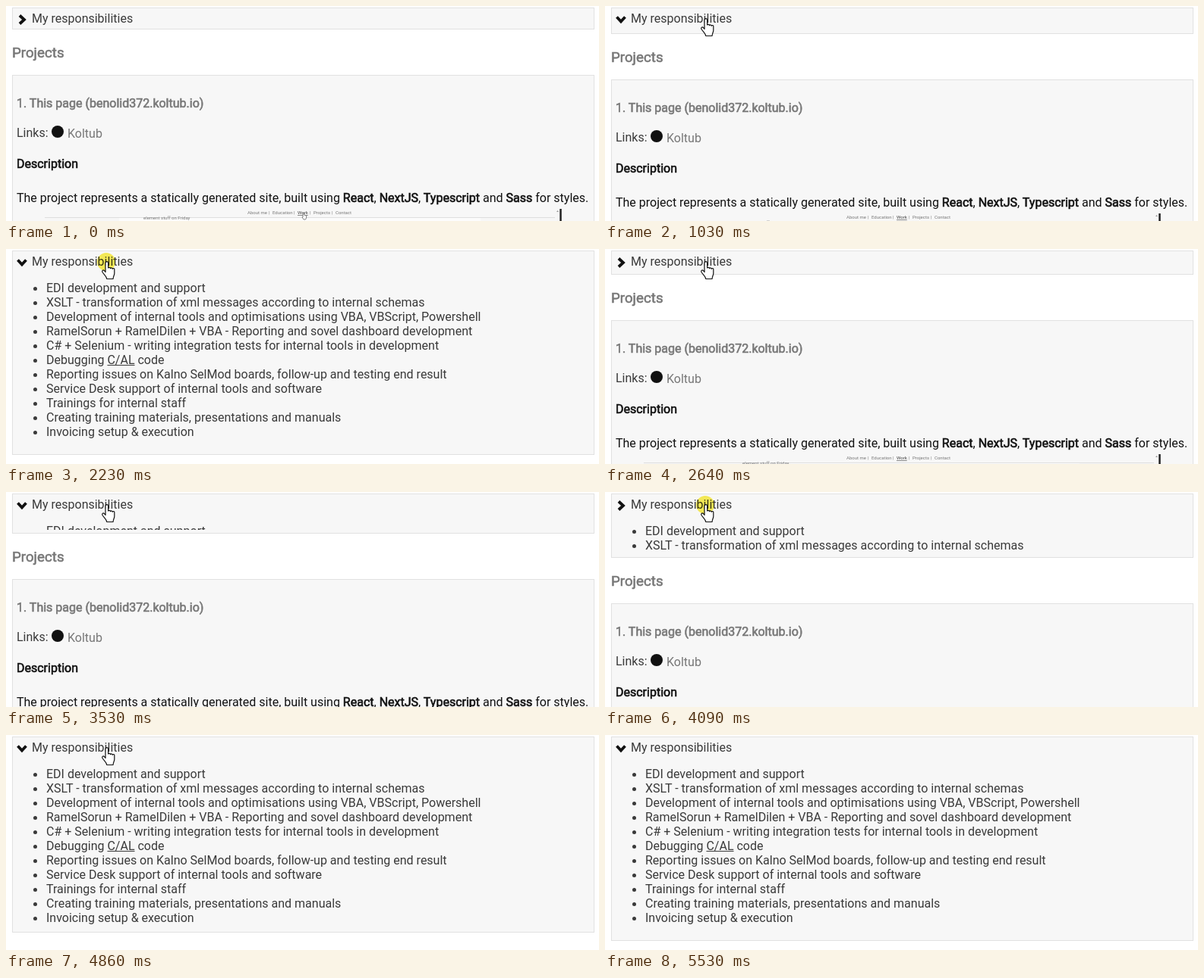
These frames come from a looping animation (781x284 px, 5860 ms). An HTML page:

```html
<!DOCTYPE html>
<html lang="en">
<head>
<meta charset="utf-8">
<title>Collapsible panel</title>
<style>
html, body { margin: 0; width: 100%; height: 100%; overflow: hidden; background: #fff; }
body { position: relative; font: 16px/19px Roboto, sans-serif; color: #3a3a3a; }
#stage { position: absolute; left: 0; top: 0; width: 781px; height: 284px; overflow: hidden; }
#stage div, svg { position: absolute; white-space: nowrap; }
.box { left: 8px; width: 765px; background: #f7f7f7; border: 1px solid #e1e1e1; }
#panel { top: 2px; }
#clip { left: 0; top: 0; width: 100%; overflow: hidden; }
ul { position: absolute; left: 0; top: 39px; margin: 0; padding: 0 0 0 44px; list-style: none; }
li { position: relative; height: 19px; white-space: nowrap; }
li::before { content: ""; position: absolute; left: -17px; top: 8px; width: 5px; height: 5px; border-radius: 50%; background: #3a3a3a; }
#below { left: 0; top: 0; width: 781px; height: 320px; }
b { font-weight: 400; -webkit-text-stroke: .6px currentColor; }
.gray { color: #777; }
.black { color: #111; }
#thumb { left: 51px; top: 267px; width: 682px; height: 60px; overflow: hidden; }
svg { left: 0; top: 0; overflow: visible; }
</style>
</head>
<body>
<div id="stage">
  <div id="panel" class="box">
    <div id="clip">
      <ul>
        <li>EDI development and support</li>
        <li>XSLT - transformation of xml messages according to internal schemas</li>
        <li>Development of internal tools and optimisations using VBA, VBScript, Powershell</li>
        <li>RamelSorun + RamelDilen + VBA - Reporting and sovel dashboard development</li>
        <li>C# + Selenium - writing integration tests for internal tools in development</li>
        <li>Debugging <u>C/AL</u> code</li>
        <li>Reporting issues on Kalno SelMod boards, follow-up and testing end result</li>
        <li>Service Desk support of internal tools and software</li>
        <li>Trainings for internal staff</li>
        <li>Creating training materials, presentations and manuals</li>
        <li>Invoicing setup &amp; execution</li>
      </ul>
    </div>
  </div>
  <div style="left:34px;top:7px">My responsibilities</div>

  <div id="below">
    <div class="gray" style="left:8px;top:51px;font-size:18.72px;line-height:22px"><b>Projects</b></div>
    <div class="box" style="top:91px;height:400px"></div>
    <div class="gray" style="left:14px;top:119px"><b>1. This page (benolid372.koltub.io)</b></div>
    <div style="left:14px;top:158px">Links:</div>
    <div style="left:60px;top:158px;width:16px;height:16px;border-radius:50%;background:#111"></div>
    <div class="gray" style="left:81px;top:159px">Koltub</div>
    <div class="black" style="left:14px;top:199px"><b>Description</b></div>
    <div class="black" style="left:14px;top:244px">The project represents a statically generated site, built using <b>React</b>, <b>NextJS</b>, <b>Typescript</b> and <b>Sass</b> for styles.</div>
    <div id="thumb">
      <svg width="682" height="60">
        <path d="M0 12.5H672" stroke="#dedede"/>
        <path d="M98 13H574V60H98Z" fill="#fcfcfc"/>
        <path d="M679.5 1V60" stroke="#222" stroke-width="2.5"/>
        <path d="M674 5l1.5-2 1.5 2z" fill="#999"/>
        <g font-family="Roboto, sans-serif" font-size="6" fill="#777">
          <text x="267" y="8">About me</text><text x="295" y="8">|</text>
          <text x="300" y="8">Education</text><text x="328" y="8">|</text>
          <text x="333" y="8" text-decoration="underline" fill="#444">Work</text><text x="349" y="8">|</text>
          <text x="354" y="8">Projects</text><text x="378" y="8">|</text>
          <text x="383" y="8">Contact</text>
          <text x="130" y="14.5">element stuff on Friday</text>
        </g>
        <path id="mini" d="M340 12V6.5h1.5V9l3 .8V13l-1 2h-2.5l-2-3z" fill="#fff" stroke="#555" stroke-width=".7"/>
      </svg>
    </div>
  </div>

  <svg width="781" height="284">
    <path id="chevron" d="M-3.5-5.5L2.5 0L-3.5 5.5" fill="none" stroke="#111" stroke-width="3.8"/>
    <circle id="press" cx="132" cy="17" r="12" fill="#fbee3c" style="mix-blend-mode:multiply" opacity=".85"/>
    <g id="cursor" fill="#fff" stroke="#111" stroke-width="1.2" stroke-linejoin="round">
      <path id="hand" d="M-1 13V2.5a1.8 1.8 0 0 1 3.6 0V9a1.6 1.6 0 0 1 2.9.6a1.5 1.5 0 0 1 2.7.7a1.4 1.4 0 0 1 2.6 1V16c0 3-1.6 4-1.8 7.5H.8C.5 20-3 18-5.1 14.2c-.8-1.8 1.2-3 2.6-1.6L-1 14.5z"/>
      <path id="arrow" d="M.5.5V16.5L4.3 13L6.8 18.7L9.3 17.6L6.8 12H12z"/>
    </g>
  </svg>
</div>

<script>
const LOOP = 5860, STEP = 70, SLIDE = 400;
const CLOSED = 30, FULL = 241;
// Screen refreshes come every STEP, restarting at each of these times.
const restarts = [0, 620, 1030, 2230, 2360, 3400, 3530, 4020, 5190, 5530];
const toggles = [1013, 2295, 3489, 3903, 4110, 4357, 4600];
const presses = [[890, 1010], [2225, 2350], [3395, 3480], [3860, 3900], [4080, 4140], [4300, 4357], [4570, 4640]];
const HOME = [132, 16], ENTRY = [685, 275], EXIT = [657, 270];

const $ = id => document.getElementById(id);
const show = (id, on) => $(id).style.display = on ? "" : "none";
const clamp = v => Math.min(1, Math.max(0, v));
const mix = (a, b, u) => a + (b - a) * u;

// cubic-bezier(.25, .1, .25, 1)
function ease(x) {
  if (x <= 0 || x >= 1) return clamp(x);
  let lo = 0, hi = 1;
  const curve = (s, a, b) => 3 * (1 - s) ** 2 * s * a + 3 * (1 - s) * s * s * b + s ** 3;
  for (let i = 0; i < 24; i++) {
    const s = (lo + hi) / 2;
    if (curve(s, .25, .25) < x) lo = s; else hi = s;
  }
  return curve(lo, .1, 1);
}

function snap(t) {
  const start = restarts.filter(r => r <= t).pop();
  return start + Math.floor((t - start) / STEP) * STEP;
}

function panelState(t) {
  let amount = 0, open = false;
  toggles.forEach((start, i) => {
    if (t < start) return;
    open = !open;
    const goal = open ? 1 : 0;
    const end = Math.min(t, toggles[i + 1] ?? LOOP);
    const length = SLIDE * Math.abs(goal - amount);
    amount = mix(amount, goal, ease((end - start) / length));
  });
  return { amount, open };
}

function cursorAt(t) {
  const move = (a, b, u) => [mix(a[0], b[0], u), mix(a[1], b[1], u)];
  if (t < 5150) return move(ENTRY, HOME, 1 - (1 - clamp((t - 70) / 630)) ** 1.25);
  return move(HOME, EXIT, ((t - 5150) / 320) ** 1.3);
}

function draw(time) {
  const t = snap(time);
  const { amount, open } = panelState(t);
  const bottom = Math.round(CLOSED + FULL * amount);
  $("panel").style.height = bottom - 3 + "px";
  $("clip").style.height = bottom - 7 + "px";
  $("below").style.top = bottom - CLOSED + "px";
  $("chevron").setAttribute("transform", open ? "translate(21 18) rotate(90)" : "translate(21.5 18)");

  const [x, y] = cursorAt(t).map(Math.round);
  const onTitle = y < 30 && x < 170;
  $("cursor").setAttribute("transform", `translate(${x} ${y})`);
  show("cursor", t >= 70 && t < 5530);
  show("hand", onTitle);
  show("arrow", !onTitle);
  show("press", presses.some(([a, b]) => t >= a && t < b));
  show("mini", t < 300);
}

const began = performance.now();
function tick() {
  draw((performance.now() - began) % LOOP);
  requestAnimationFrame(tick);
}
draw(0);
requestAnimationFrame(tick);
</script>
</body>
</html>
```
